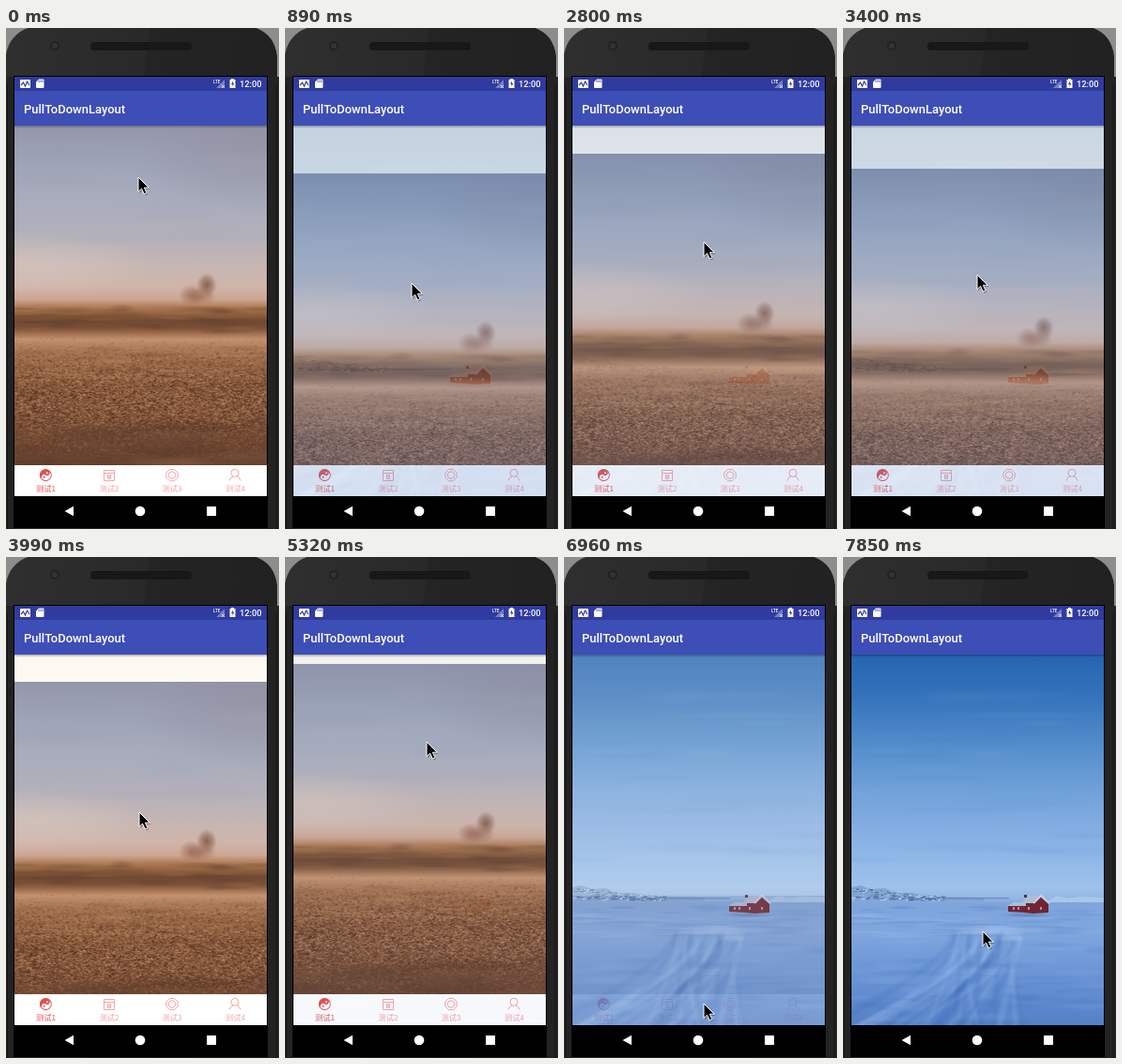
Animation, 291 px wide and 534 px high, one loop 8000 ms. Source, as an HTML page with a canvas:

```html
<!DOCTYPE html>
<html lang="zh">
<head>
<meta charset="utf-8">
<title>PullToDownLayout</title>
<style>
html, body { margin: 0; width: 100%; height: 100%; overflow: hidden; background: #8d8d8d; }
#stage { position: relative; width: 291px; height: 534px; overflow: hidden; }
#stage > * { position: absolute; left: 0; top: 0; }
#stage > .view { left: 9px; top: 104px; width: 269px; height: 395px; overflow: hidden; }
#front { background: #fdf9f2; }
#front > * { position: absolute; left: 0; top: 0; }
#front > #tabs { top: 362px; background: #fff; }
svg { display: block; overflow: hidden; }
text { font-family: Roboto, sans-serif; font-weight: 500; fill: #fff; }
#tabs text { font: 8.2px "Noto Sans CJK SC", "Noto Sans CJK", sans-serif; text-anchor: middle; fill: #f4a5a6; }
#tabs .on text { font-weight: 500; fill: #e5504d; }
#tabs .line { fill: none; stroke: #f4a5a6; stroke-width: 1; }
</style>
</head>
<body>
<div id="stage">
  <svg width="291" height="534">
    <defs>
      <linearGradient id="body" x1="0" y1="0" x2="1" y2=".25">
        <stop offset="0" stop-color="#2f2f2f"/><stop offset=".5" stop-color="#292929"/>
        <stop offset=".5" stop-color="#242424"/><stop offset="1" stop-color="#212121"/>
      </linearGradient>
      <pattern id="mesh" width="3" height="3" patternUnits="userSpaceOnUse">
        <rect width="3" height="3" fill="#1a1a1a"/><rect width="1.5" height="1.5" fill="#111"/>
      </pattern>
    </defs>
    <rect width="291" height="534" fill="#8d8d8d"/>
    <path d="M0 534V28C3 13 11 4 26-1H264C279 4 287 14 289 30V534Z" fill="url(#body)"/>
    <path d="M0 52H9V534H0ZM278 52H291V534H278Z" fill="#232323"/>
    <path d="M1.5 60V534M288 60V534" stroke="#161616"/>
    <circle cx="52" cy="19" r="5" fill="#222"/>
    <circle cx="52" cy="19" r="3" fill="#333"/>
    <rect x="90" y="15" width="108" height="9" rx="4" fill="url(#mesh)"/>
    <rect x="8" y="51" width="271" height="482" fill="#000"/>
    <rect x="9" y="52" width="269" height="15" fill="#303b9f"/>
    <rect x="9" y="67" width="269" height="37" fill="#3d4eb7"/>
    <text x="19" y="90.5" font-size="13">PullToDownLayout</text>
    <rect x="15" y="55" width="11" height="9" rx="1" fill="#fff"/>
    <path d="M16 61L18.5 58L20.5 62L22.5 57L25 61" fill="none" stroke="#303b9f" stroke-width="1.2"/>
    <path d="M35 54.5H39.5Q40.5 54.5 40.5 55.5V63Q40.5 64 39.5 64H33Q32 64 32 63V57.5Z" fill="#fff"/>
    <path d="M35 55.5V58M37 55.5V58M39 55.5V58" stroke="#303b9f" stroke-width=".8"/>
    <path d="M233 55V64H224Z" fill="#7780c2"/>
    <text x="221" y="58.5" font-size="4.5">LTE</text>
    <path d="M230 61L233 64M233 61L230 64" stroke="#fff" stroke-width=".8"/>
    <path d="M240 54H243V55H244.5V64H238.5V55H240Z" fill="#fff"/>
    <path d="M242 56.5L240 60H241.5V62.5L243.3 59H242Z" fill="#303b9f"/>
    <text x="249" y="63" font-size="9.3">12:00</text>
    <path d="M62.5 515L72 509.7V520.3Z" fill="#fff"/>
    <circle cx="143" cy="515" r="5.3" fill="#fff"/>
    <rect x="214" y="510" width="10" height="10" fill="#fff"/>
  </svg>
  <canvas id="snow" class="view" width="269" height="395"></canvas>
  <div id="front" class="view">
    <canvas id="desert" width="269" height="395"></canvas>
    <svg id="tabs" width="269" height="33" viewBox="9 466 269 33">
      <g class="on">
        <g transform="translate(42.3 476.5) rotate(35)">
          <circle r="6.5" fill="#e5504d"/>
          <path d="M0-5.6A5.6 5.6 0 0 1 0 5.6A2.8 2.8 0 0 1 0 0A2.8 2.8 0 0 0 0-5.6Z" fill="#fff"/>
          <circle cy="-2.8" r="1" fill="#fff"/>
          <circle cy="2.8" r="1" fill="#e5504d"/>
        </g>
        <text x="42.5" y="494">测试1</text>
      </g>
      <g>
        <path class="line" d="M104.5 471.5H115.5V482.5H104.5ZM104.5 474.5H115.5M108.5 476.5H111.5V480.5H108.5ZM108.5 478.5H111.5"/>
        <text x="110" y="494">测试2</text>
      </g>
      <g>
        <path class="line" d="M174.5 470.5H179.5L183.2 474V479L179.5 482.7H174.5L170.8 479V474Z"/>
        <circle class="line" cx="177" cy="476.6" r="3.8"/>
        <text x="177" y="494">测试3</text>
      </g>
      <g>
        <circle class="line" cx="244" cy="474.3" r="4"/>
        <path class="line" d="M238 482.5Q239 478.5 242 478M246 478Q249 478.5 250 482.5"/>
        <text x="244.5" y="494">测试4</text>
      </g>
    </svg>
  </div>
  <svg width="291" height="534">
    <defs><linearGradient id="drop" x2="0" y2="1">
      <stop stop-opacity=".3"/><stop offset="1" stop-opacity="0"/>
    </linearGradient></defs>
    <rect x="9" y="104" width="269" height="3" fill="url(#drop)"/>
  </svg>
  <svg id="cursor" width="18" height="24" viewBox="-1 -1 18 24">
    <path d="M1 2V17L5 14L7.5 19.5L10 18.5L8 13H12.5Z" fill="#000" opacity=".3"/>
    <path d="M0 0V15.5L3.6 12.2L6.2 18L8.9 16.8L6.4 11.2H11.2Z" fill="#000" stroke="#fff" stroke-width="1"/>
  </svg>
</div>
<script>
const $ = id => document.getElementById(id);
const X0 = 9, X1 = 278, Y0 = 104, Y1 = 499;

let seed = 7;
const rand = () => (seed = seed * 16807 % 2147483647) / 2147483647;

function scene(id) {
  const g = $(id).getContext('2d');
  g.translate(-X0, -Y0);
  return g;
}

// stops: [y, colour] pairs in stage coordinates
function backdrop(g, stops) {
  const grad = g.createLinearGradient(0, Y0, 0, Y1);
  for (const [y, c] of stops) grad.addColorStop((y - Y0) / (Y1 - Y0), c);
  g.fillStyle = grad;
  g.fillRect(X0, Y0, X1 - X0, Y1 - Y0);
}

function shape(g, path, fill) {
  g.fillStyle = fill;
  g.fill(new Path2D(path));
}

function puff(g, x, y, rx, ry, rgb, alpha) {
  g.save();
  g.translate(x, y);
  g.scale(rx, ry);
  const grad = g.createRadialGradient(0, 0, 0, 0, 0, 1);
  grad.addColorStop(0, `rgba(${rgb},${alpha})`);
  grad.addColorStop(.5, `rgba(${rgb},${alpha * .6})`);
  grad.addColorStop(1, `rgba(${rgb},0)`);
  g.fillStyle = grad;
  g.fillRect(-1, -1, 2, 2);
  g.restore();
}

// count soft patches scattered over a band, light or dark at random
function patches(g, count, [top, bottom], [w, h], light, dark, alpha) {
  for (let i = 0; i < count; i++)
    puff(g, X0 + rand() * 269, top + rand() * (bottom - top), w * (.5 + rand()),
      h * (.5 + rand()), rand() < .5 ? light : dark, alpha);
}

function paintSnow() {
  const g = scene('snow');
  backdrop(g, [[104, '#2565b1'], [150, '#3573bb'], [200, '#528ccb'], [230, '#659ad4'],
    [280, '#80abe1'], [330, '#94bbe9'], [352, '#9fc2eb'], [364, '#93b6e2'],
    [369, '#7fa5dc'], [400, '#80a6de'], [440, '#6c96d6'], [499, '#5580c7']]);
  patches(g, 24, [115, 340], [80, 6], '150,195,235', '45,105,180', .07);

  shape(g, 'M9 352L18 350L30 354L44 353L58 358L74 358L95 362L150 363V367H9Z', '#83a5d2');
  for (let i = 0; i < 150; i++) {
    const x = X0 + rand() * 100;
    g.fillStyle = ['#c0d5ee', '#3f649a', '#557db2'][i % 3];
    g.fillRect(x, 352 + (x - X0) * .1 + rand() * (13 - (x - X0) * .09), 1 + rand() * 4, 1);
  }
  shape(g, 'M219 366L228 361L240 364L252 362L278 363V368H219Z', '#a9c6eb');
  g.fillStyle = 'rgba(70,110,165,.5)';
  g.fillRect(95, 363, 82, 1.5);

  // wind-blown ridges sweeping down from the drift
  g.filter = 'blur(1.5px)';
  for (let i = 0; i < 34; i++) {
    const x = 115 + rand() * 75, y = 396 + rand() * 14, end = x - 150 + rand() * 170;
    g.strokeStyle = i % 2 ? 'rgba(160,195,238,.2)' : 'rgba(50,95,175,.15)';
    g.lineWidth = 2 + rand() * 5;
    g.beginPath();
    g.moveTo(x, y);
    g.quadraticCurveTo(x - 5, y + 35, end, 505);
    g.stroke();
  }
  g.filter = 'none';
  patches(g, 60, [373, 405], [32, 2], '170,200,240', '80,125,195', .25);
  patches(g, 50, [400, 495], [30, 4], '150,185,235', '60,105,180', .16);
  puff(g, 158, 398, 40, 6, '185,210,245', .5);
  puff(g, 180, 404, 16, 7, '175,204,242', .4);

  shape(g, 'M176 372H194V379L176 378Z', '#6d2735');
  shape(g, 'M193 368H203L211 361L219 368V379L203 380L193 379Z', '#6d2531');
  shape(g, 'M175 372L182 368H195V372Z', '#a9bddb');
  shape(g, 'M190 369L198 361H211L203 369Z', '#aebdd6');
  g.strokeStyle = '#c0cfe4';
  g.stroke(new Path2D('M203 369L211 361L220 369'));
  g.fillStyle = '#55303f';
  g.fillRect(193, 360, 3, 3);
  g.fillStyle = '#b8949c';
  for (const x of [181, 186, 197, 210]) g.fillRect(x, 373, 2, 3);
  puff(g, 198, 382, 28, 2.5, '60,95,160', .4);
}

function paintDesert() {
  const g = scene('desert');
  backdrop(g, [[104, '#9497ab'], [150, '#a0a5b8'], [190, '#a9adbd'], [220, '#b3b0ba'],
    [250, '#c4b5b4'], [275, '#d0b5aa'], [289, '#cba793'], [296, '#b5835f'],
    [304, '#95643f'], [312, '#704a33'], [320, '#795037'], [327, '#a97655'],
    [332, '#c29270'], [340, '#b07d5b'], [355, '#9b6a49'], [380, '#8a5a3c'],
    [410, '#80523a'], [440, '#6e4631'], [466, '#674331'], [499, '#57392a']]);
  puff(g, 30, 252, 130, 34, '222,205,195', .45);
  puff(g, 270, 125, 130, 75, '145,140,158', .5);
  patches(g, 16, [115, 250], [80, 10], '185,182,190', '145,150,172', .1);

  puff(g, 214, 274, 11, 13, '128,82,66', .85);
  puff(g, 198, 285, 14, 12, '160,108,86', .8);
  puff(g, 208, 286, 16, 9, '150,98,78', .6);
  patches(g, 40, [296, 325], [30, 3], '165,112,78', '80,48,32', .25);

  // sand: broad drifts, then grain densest in the middle distance
  patches(g, 60, [338, 375], [35, 3], '190,138,100', '112,70,46', .25);
  patches(g, 40, [375, 490], [45, 9], '150,102,70', '78,48,33', .2);
  for (let i = 0; i < 11000; i++) {
    const k = (rand() + rand()) / 2;
    const fade = .1 + .24 * Math.sin(Math.PI * k);
    g.fillStyle = rand() < .5 ? `rgba(215,160,115,${fade})` : `rgba(55,32,22,${fade})`;
    g.fillRect(X0 + rand() * 269, 328 + k * 135, 1 + rand() * 2, 1);
  }
  patches(g, 14, [425, 490], [55, 12], '115,76,54', '78,50,37', .35);
}

// step, cursor x, cursor y, pull distance, front opacity
const KEYS = [
  [-1, 141, 159, 0, 1], [7, 132, 340, 82, .58], [9, 131, 332, 78, .6],
  [17, 149, 228, 30, .846], [22, 142, 272, 50, .745], [23, 142, 272, 49, 1],
  [24, 142, 272, 41, 1], [25, 142, 272, 29, 1], [26, 142, 272, 10, 1],
  [27, 142, 272, 0, 1], [28, 142, 272, 0, 1], [31, 150, 157, 0, 1],
  [32, 150, 157, 0, 1], [33, 150, 177, 3, .985], [34, 151, 197, 10, .95],
  [38, 149, 383, 82, .58], [39, 149, 476, 119, .39], [42, 149, 476, 120, .385],
  [43, 149, 476, 127, .37], [45, 149, 476, 257, .2], [47, 149, 476, 395, 0],
  [49, 149, 476, 395, 0], [51, 149, 399, 395, 0]
];
const LOOP = 8000, START = 290, STEP = 147.6;

function pose(step) {
  const i = KEYS.findIndex(k => k[0] >= step);
  if (i < 1) return KEYS[i < 0 ? KEYS.length - 1 : 0];
  const a = KEYS[i - 1], b = KEYS[i];
  const p = (step - a[0]) / (b[0] - a[0]);
  return a.map((v, j) => v + (b[j] - v) * p);
}

function draw(now) {
  const step = Math.max(-1, Math.floor((now % LOOP - START) / STEP));
  const [, x, y, pull, alpha] = pose(step);
  $('cursor').style.transform = `translate(${Math.round(x) - 1}px, ${Math.round(y) - 1}px)`;
  $('desert').style.transform = `translateY(${Math.round(pull)}px)`;
  $('front').style.opacity = alpha;
  requestAnimationFrame(draw);
}

paintSnow();
paintDesert();
draw(performance.now());
</script>
</body>
</html>
```
